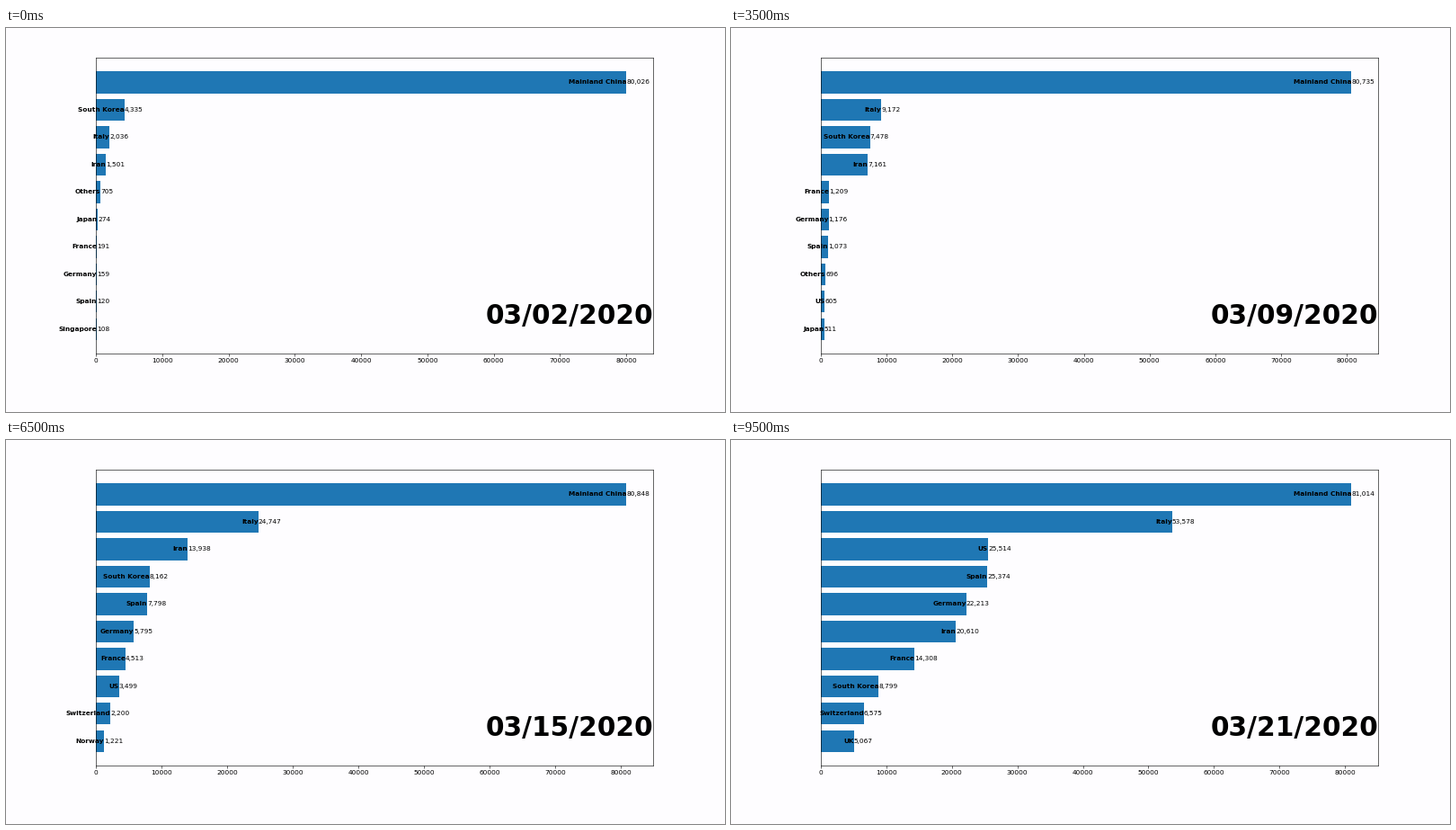
A matplotlib script that plays this animation: 800x427 px, repeating every 10000 ms.

```python
import math

import numpy as np
import matplotlib.pyplot as plt
from matplotlib.animation import FuncAnimation

WIDTH, HEIGHT, DPI = 800, 427, 64
SCALE = 1 / 1.2            # point sizes relative to a 1080 px wide layout
DAYS, FIRST_DATE, ROWS = 20, 2, 10
BACKGROUND, BAR = "#fefdff", "#1f77b4"
_ = math.nan               # day filled in by steady growth between neighbours

# Confirmed cases: first day index, then one value per day.
CASES = {
    "Mainland China": (0, [80026, _, 80271, _, 80573, _, _, 80735, _, _, 80793,
                           _, _, 80848, _, _, _, 80931, _, 81014]),
    "Italy": (0, [2036, _, _, _, 4636, _, _, 9172, 10149, 12462, 12462,
                  17660, 21157, 24747, _, 31506, 35713, 41035, _, 53578]),
    "Iran": (0, [1501, 2336, 2922, _, 4747, 5823, 6566, 7161, _, _, 10075,
                 11364, 12729, 13938, _, 16169, _, 18407, 19644, 20610]),
    "South Korea": (0, [4335, 5186, 5621, _, 6593, _, 7314, 7478, 7513, 7755,
                        7869, _, _, 8162, _, _, _, 8565, _, 8799]),
    "Spain": (0, [120, _, _, _, 400, 500, 673, 1073, 1695, 2277, 2277,
                  5232, 6391, 7798, 9942, _, 13910, 17963, 20410, 25374]),
    "Germany": (0, [159, 196, 262, 482, 670, _, _, 1176, _, 1908, 2078,
                    3675, 4585, 5795, _, 9257, 12327, 15320, 19848, 22213]),
    "France": (0, [191, 204, _, _, 653, 949, 1126, 1209, 1784, 2281, 2284,
                   3667, 4480, 4513, 6650, _, _, 10886, _, 14308]),
    "US": (0, [100, _, _, _, 278, _, 537, 605, 959, _, 1663,
               _, _, 3499, 4632, 6421, 7786, 13680, 19101, 25514]),
    "Others": (0, [705, _, _, 706, 696, _, _, _, _, _, 696]),
    "Japan": (0, [274, _, _, _, 420, _, _, 511, _, 639]),
    "Singapore": (0, [108]),
    "Switzerland": (9, [652, 652, 1139, 1359, 2200, 2200, 2700, 3028, 4075,
                        _, 6575]),
    "UK": (12, [1143, 1144, 1551, _, 2642, 2716, 4014, 5067]),
    "Norway": (10, [702, 996, 1090, 1221]),
}


def fill_gaps(values):
    values = np.array(values, dtype=float)
    days = np.arange(len(values))
    known = ~np.isnan(values)
    logs = np.interp(days, days[known], np.log(values[known]))
    return np.rint(np.exp(logs)).astype(int)


SERIES = {name: (start, fill_gaps(values))
          for name, (start, values) in CASES.items()}


def ranking(day):
    """Largest countries of the day, smallest first."""
    totals = [(values[day - start], name)
              for name, (start, values) in SERIES.items()
              if 0 <= day - start < len(values)]
    return sorted(totals)[-ROWS:]


plt.rcParams.update({
    "font.family": "DejaVu Sans",
    "font.size": 10 * SCALE,
    "axes.linewidth": 0.8 * SCALE,
    "xtick.major.width": 0.8 * SCALE,
    "xtick.major.size": 3.5 * SCALE,
    "xtick.major.pad": 3.5 * SCALE,
})

fig = plt.figure(figsize=(WIDTH / DPI, HEIGHT / DPI), dpi=DPI,
                 facecolor=BACKGROUND)
LEFT, RIGHT, TOP, BOTTOM = 100, 720, 33.3, 361.9
ax = fig.add_axes([LEFT / WIDTH, 1 - BOTTOM / HEIGHT,
                   (RIGHT - LEFT) / WIDTH, (BOTTOM - TOP) / HEIGHT])


def draw(day):
    ax.clear()
    ax.set_facecolor(BACKGROUND)
    ax.set_yticks([])
    rows = ranking(day)
    ax.barh(range(ROWS), [total for total, name in rows], color=BAR)
    for y, (total, name) in enumerate(rows):
        ax.text(total, y, name, ha="right", va="center", weight="bold")
        ax.text(total, y, f"{total:,}", ha="left", va="center")
    ax.text(1, 0.1, f"03/{FIRST_DATE + day:02d}/2020", transform=ax.transAxes,
            ha="right", size=40 * SCALE, weight="bold")
    ax.set_xlim(0, rows[-1][0] * 1.05)
    ax.set_ylim(-0.89, ROWS - 0.11)
    ax.set_xticks(range(0, 80001, 10000))


animation = FuncAnimation(fig, draw, frames=DAYS, init_func=lambda: None,
                          interval=500, repeat=True, repeat_delay=0)
plt.show()
```
